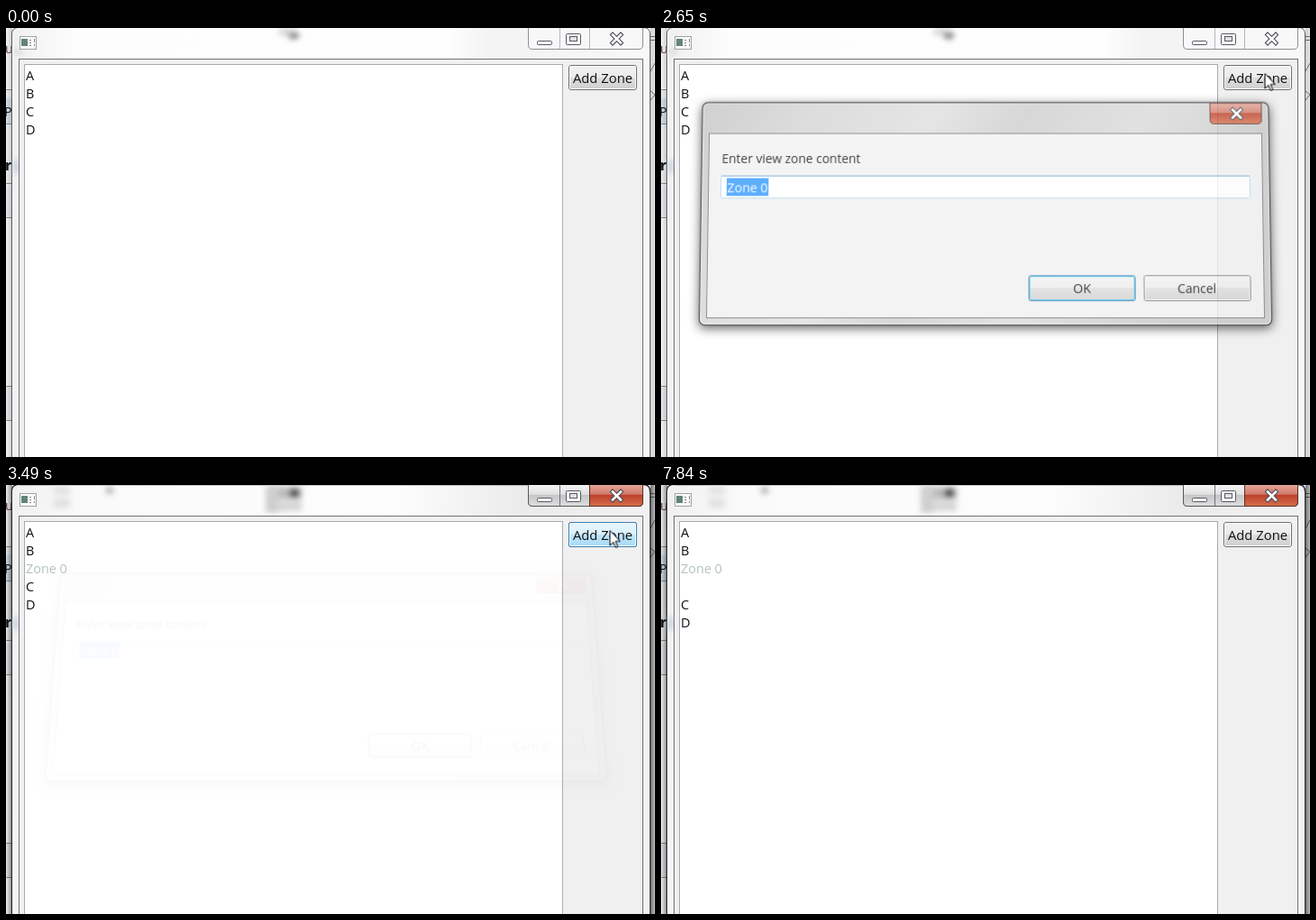
These frames come from a looping animation (720x476 px, 8 s). An HTML page:

```html
<!DOCTYPE html>
<html lang="en">
<head>
<meta charset="utf-8">
<title>View zones</title>
<style>
html, body { margin: 0; width: 100%; height: 100%; overflow: hidden; background: #fff; }
svg { position: absolute; left: 0; top: 0; width: 720px; height: 476px; overflow: hidden; }
text { font: 14.4px "Open Sans", "Noto Sans", sans-serif; fill: #111; }
.mid { text-anchor: middle; }
.anim { animation: 8s linear infinite; }
.step { animation: 8s step-end infinite; }

.active { animation-name: activate; }
@keyframes activate {
  0%, 12.25% { opacity: 0; }
  13.1%, 31.125% { opacity: 1; }
  32%, 41.6% { opacity: 0; }
  41.65%, 100% { opacity: 1; }
}
.idle { animation-name: deactivate; }
@keyframes deactivate {
  0%, 12.25% { opacity: 1; }
  13.1%, 31.125% { opacity: 0; }
  32%, 41.6% { opacity: 1; }
  41.65%, 100% { opacity: 0; }
}
.hover { animation-name: hover; }
@keyframes hover {
  0%, 23.6% { opacity: 0; }
  26.25%, 31.125% { opacity: 1; }
  32%, 41.9% { opacity: 0; }
  43.4%, 51% { opacity: 1; }
  60%, 100% { opacity: 0; }
}
.focus { animation-name: focus; }
@keyframes focus {
  0%, 41.6% { opacity: 0; }
  41.65%, 69.2% { opacity: 1; }
  74.8%, 100% { opacity: 0; }
}
.tail { animation-name: tail; }
@keyframes tail {
  0% { transform: none; }
  41.625%, 90% { transform: translateY(20px); }
  77.625%, 91.25%, 100% { transform: translateY(40px); }
}
.zone { animation-name: zone; fill: #b2c1c1; }
@keyframes zone {
  0% { visibility: hidden; }
  41.625%, 100% { visibility: visible; }
}
.caret { animation-name: caret; }
@keyframes caret {
  0%, 19%, 31.125%, 75.75% { opacity: 0; transform: none; }
  12.25%, 25.625%, 69.2%, 90% { opacity: 1; transform: none; }
  77.625%, 91.25% { opacity: 1; transform: translate(-9px, 40px); }
  84.25%, 97.875%, 100% { opacity: 0; transform: translate(-9px, 40px); }
}
.dialog { animation-name: dialog; transform-origin: 360px 205px; }
@keyframes dialog {
  0%, 31.125% { opacity: 0; transform: perspective(1000px) rotateX(14deg) scale(.94); animation-timing-function: ease-out; }
  34.4%, 41.95% { opacity: 1; transform: perspective(1000px) rotateX(0deg) scale(1); }
  42.625% { opacity: .5; transform: translate(-2px, 2px) perspective(1000px) rotateX(6deg) scale(.975); }
  43.625% { opacity: .04; transform: translate(-5px, 5px) perspective(1000px) rotateX(14deg) scale(.947); }
  44.5%, 100% { opacity: 0; transform: translate(-6px, 6px) perspective(1000px) rotateX(18deg) scale(.93); }
}
.press { animation-name: press; }
@keyframes press {
  0% { opacity: 0; }
  41.625%, 100% { opacity: 1; }
}
.pointer { animation-name: pointer; }
@keyframes pointer {
  0%, .85% { transform: translate(269px, 233px); }
  1.9%, 3.8% { transform: translate(167px, 97px); }
  9%, 18% { transform: translate(46px, 74px); }
  20.4%, 22.3% { transform: translate(503px, 46px); }
  24.25%, 28% { transform: translate(669.5px, 47.5px); }
  30%, 50.2% { transform: translate(669.5px, 50.5px); }
  52.2% { transform: translate(549px, 77px); }
  54.1% { transform: translate(337px, 49px); }
  55.1% { transform: translate(327px, 47px); }
  56.1% { transform: translate(170px, 50px); }
  57.1% { transform: translate(106px, 49px); }
  59.1% { transform: translate(80px, 52px); }
  60.1% { transform: translate(68px, 58px); }
  61.1% { transform: translate(47px, 67px); }
  62.5%, 100% { transform: translate(42px, 74px); }
}
.beam { animation-name: beam; }
@keyframes beam {
  0%, 23.6%, 77.625%, 100% { visibility: hidden; }
  .85%, 51.1% { visibility: visible; }
}
.arrow { animation-name: arrow; }
@keyframes arrow {
  0%, 51.1%, 100% { visibility: hidden; }
  23.6% { visibility: visible; }
}
</style>
</head>
<body>
<svg viewBox="0 0 720 476">
  <defs>
    <linearGradient id="face" x2="0" y2="1">
      <stop stop-color="#f2f2f2"/><stop offset=".48" stop-color="#ebebeb"/>
      <stop offset=".5" stop-color="#dddddd"/><stop offset="1" stop-color="#cfcfcf"/>
    </linearGradient>
    <linearGradient id="faceHover" x2="0" y2="1">
      <stop stop-color="#eaf6fd"/><stop offset=".48" stop-color="#d9f0fc"/>
      <stop offset=".5" stop-color="#bee6fd"/><stop offset="1" stop-color="#a7d9f5"/>
    </linearGradient>
    <linearGradient id="red" x2="0" y2="1">
      <stop stop-color="#e5a99c"/><stop offset=".46" stop-color="#d2796a"/>
      <stop offset=".5" stop-color="#bd3f2a"/><stop offset="1" stop-color="#d4704c"/>
    </linearGradient>
    <linearGradient id="steel" x2="0" y2="1">
      <stop stop-color="#f4f4f4"/><stop offset=".46" stop-color="#e2e2e2"/>
      <stop offset=".5" stop-color="#c6c6c6"/><stop offset="1" stop-color="#dedede"/>
    </linearGradient>
    <linearGradient id="bar">
      <stop stop-color="#f0f0f0"/><stop offset=".1" stop-color="#fdfdfd"/>
      <stop offset=".68" stop-color="#fefefe"/><stop offset=".75" stop-color="#f3f3f3"/>
      <stop offset="1" stop-color="#f8f8f8"/>
    </linearGradient>
    <linearGradient id="barActive" x2="1" y2=".05">
      <stop stop-color="#f0f0f0"/><stop offset=".12" stop-color="#fafafa"/>
      <stop offset=".6" stop-color="#fdfdfd"/><stop offset=".72" stop-color="#f2f2f2"/>
      <stop offset=".8" stop-color="#ebebeb"/><stop offset="1" stop-color="#f2f2f2"/>
    </linearGradient>
    <linearGradient id="shadeL"><stop stop-color="#000" stop-opacity=".04"/><stop offset="1" stop-color="#000" stop-opacity=".42"/></linearGradient>
    <linearGradient id="shadeR"><stop stop-color="#000" stop-opacity=".55"/><stop offset="1" stop-color="#000" stop-opacity=".25"/></linearGradient>
    <filter id="soft" x="-50%" y="-50%" width="200%" height="200%"><feGaussianBlur stdDeviation="3"/></filter>
    <path id="cross" d="M-4.500 -4.500 L4.500 4.500 M4.500 -4.500 L-4.500 4.500"/>
    <g id="close" stroke-linecap="square">
      <use href="#cross" stroke="#4c4f58" stroke-width="4.800"/>
      <use href="#cross" stroke="#fff" stroke-width="2.600"/>
    </g>
    <path id="frame" d="M6.500 477 V7 Q6.500 -.5 14 -.5 H707 Q714.5 -.5 714.5 7 V477 Z"/>
    <path id="caption" d="M579.5 -1 V19 Q579.5 23.5 584 23.5 H702 Q706.5 23.5 706.5 19 V-1"/>
  </defs>

  <!-- desktop strips -->
  <rect width="720" height="476" fill="#f8f8f9"/>
  <rect y="68" width="7" height="107" fill="#eff0f2"/>
  <rect y="78" width="7" height="28" fill="#d6e0e8"/>
  <rect y="176" width="7" height="34" fill="#e8ebef"/>
  <rect y="397" width="7" height="38" fill="#e8eaed"/>
  <path d="M0 68.5H7M0 106.5H7M0 172.5H7M0 210.5H7M0 397.5H7M0 435.5H7" stroke="#8c9096"/>
  <text x="-1" y="28" style="fill:#5a3a35">u</text>
  <text x="-2" y="98">P</text>
  <text x="-1" y="158" style="font-weight:700;font-size:16px">r</text>
  <path d="M715 9.5h5M715 13.5h5M715 48l5-9M715 70l5 4-5 6" fill="none" stroke="#777"/>
  <g class="anim idle">
    <rect width="7" height="476" fill="url(#shadeL)" opacity=".4"/>
    <rect x="715" width="5" height="476" fill="url(#shadeR)" opacity=".3"/>
  </g>
  <g class="anim active">
    <rect width="7" height="476" fill="url(#shadeL)"/>
    <rect x="715" width="5" height="476" fill="url(#shadeR)"/>
  </g>

  <!-- window glass -->
  <use href="#frame" fill="url(#bar)" stroke="#55585c"/>
  <g filter="url(#soft)" class="anim idle">
    <ellipse cx="319" cy="8" rx="6" ry="4" fill="#666"/>
    <rect x="303" y="2" width="18" height="5" fill="#c4c4c4"/>
    <path d="M8 24h10v5H8z" fill="#d5d5d5"/>
  </g>
  <g class="anim active">
    <use href="#frame" fill="url(#barActive)" stroke="#24272b" stroke-width="1.3"/>
    <g filter="url(#soft)">
      <path d="M53 2h18v8H53zM53 15h18v10H53z" fill="#e0e0e0"/>
      <ellipse cx="115" cy="6" rx="4" ry="4" fill="#aaa"/>
      <rect x="288" y="0" width="14" height="31" fill="#cfcfcf"/>
      <rect x="302" y="2" width="26" height="14" fill="#bbb"/>
      <rect x="302" y="18" width="26" height="11" fill="#d6d6d6"/>
      <ellipse cx="320" cy="9" rx="6" ry="5" fill="#3f3f3f"/>
    </g>
  </g>
  <path d="M7.500 476V8Q8 1 15 .5M713.5 476V8" fill="none" stroke="#fff" stroke-opacity=".8"/>
  <rect x="8" y="146" width="6" height="15" fill="#aebcd2" opacity=".65" filter="url(#soft)"/>

  <!-- program icon -->
  <rect x="15.500" y="9.500" width="18" height="14" fill="#fafafa" stroke="#9da3a3"/>
  <rect x="17" y="12" width="7" height="8" fill="#628378"/>
  <path d="M26 13.500h2M26 16.500h2M26 19.500h2M31.500 12v4M31.500 18v2" stroke="#888"/>

  <!-- caption buttons -->
  <use href="#caption" fill="#f8f8f8" stroke="#8d9094"/>
  <path d="M614.5 0V23M647.5 0V23" stroke="#b4b6b9"/>
  <g class="anim active">
    <use href="#caption" fill="url(#steel)" stroke="#55585d"/>
    <path d="M647.5 -1V23.5H702Q706.5 23.5 706.5 19V-1Z" fill="url(#red)" stroke="#59302b"/>
    <path d="M614.5 0V23" stroke="#6e7175"/>
  </g>
  <rect x="589.5" y="14.500" width="16" height="4" rx="1" fill="#fff" stroke="#555963"/>
  <rect x="621.5" y="6.500" width="16" height="12" rx="1" fill="#fff" stroke="#555963"/>
  <rect x="625.5" y="9.500" width="8" height="5" fill="#e2e2e2" stroke="#555963"/>
  <use href="#close" x="677.5" y="12"/>

  <!-- client area -->
  <rect x="14.500" y="34.500" width="692" height="450" fill="#f0f0f0" stroke="#6e7276"/>
  <rect x="20.500" y="40.500" width="597" height="450" fill="#fff" stroke="#a8abb0"/>
  <text x="22" y="58">A</text>
  <text x="22" y="78">B</text>
  <g class="step tail">
    <text x="22" y="98">C</text>
    <text x="22" y="118">D</text>
  </g>
  <rect class="step caret" x="31" y="63" width="1" height="19" fill="#000"/>

  <!-- Add Zone button -->
  <rect x="624.5" y="41.500" width="75" height="27" rx="2.500" fill="url(#face)" stroke="#707070"/>
  <rect x="625.5" y="42.500" width="73" height="25" rx="1.500" fill="none" stroke="#fafafa"/>
  <g class="anim focus" fill="none">
    <rect x="624.5" y="41.500" width="75" height="27" rx="2.500" stroke="#3c7fb1"/>
    <rect x="625.5" y="42.500" width="73" height="25" rx="1.500" stroke="#48c5ee"/>
  </g>
  <g class="anim hover">
    <rect x="624.5" y="41.500" width="75" height="27" rx="2.500" fill="url(#faceHover)" stroke="#3c7fb1"/>
    <rect x="625.5" y="42.500" width="73" height="25" rx="1.500" fill="none" stroke="#f3fbff"/>
  </g>
  <text class="mid" x="662" y="61" style="font-size:14.8px">Add Zone</text>
</svg>

<svg class="anim dialog" viewBox="0 0 720 476">
  <defs>
    <linearGradient id="glass" x2="1" y2=".25">
      <stop stop-color="#c3c3c3"/><stop offset=".18" stop-color="#d3d3d3"/>
      <stop offset=".4" stop-color="#dedede"/><stop offset=".55" stop-color="#cdcdcd"/>
      <stop offset=".75" stop-color="#d9d9d9"/><stop offset="1" stop-color="#c6c6c6"/>
    </linearGradient>
  </defs>
  <rect x="40.500" y="80.500" width="639" height="250" rx="6" fill="url(#glass)" stroke="#303235" stroke-width="1.4"
        style="filter:drop-shadow(0 3px 6px rgba(0,0,0,.75))"/>
  <rect x="41.800" y="81.800" width="636.400" height="247.400" rx="5" fill="none" stroke="#fff" stroke-opacity=".7"/>
  <path d="M613.5 81V100Q613.5 104.500 618 104.500H667Q671.5 104.500 671.5 100V81Z" fill="url(#red)" stroke="#59302b"/>
  <use href="#close" x="643.5" y="93"/>
  <rect x="48.500" y="115.500" width="623" height="207" fill="#f0f0f0" stroke="#707478"/>
  <text x="63" y="149" style="font-size:14px">Enter view zone content</text>
  <rect x="62.500" y="163.500" width="595" height="25" rx="1" fill="#fff" stroke="#b5d6ec"/>
  <path d="M63 163.500H657" stroke="#5c9fd0"/>
  <rect x="69" y="166" width="47" height="20" fill="#3399ff"/>
  <text x="69.500" y="182" style="fill:#fff">Zone 0</text>
  <rect x="408.5" y="275.500" width="119" height="28" rx="2.500" fill="url(#face)" stroke="#3c7fb1"/>
  <rect x="409.5" y="276.500" width="117" height="26" rx="1.500" fill="none" stroke="#48c5ee"/>
  <g class="step press" fill="none">
    <rect x="409.5" y="276.500" width="117" height="26" rx="1.500" stroke="#2f9fd6"/>
    <rect x="411.5" y="278.500" width="113" height="22" stroke="#666" stroke-dasharray="1 1"/>
  </g>
  <text class="mid" x="468" y="295.500">OK</text>
  <rect x="537.5" y="275.500" width="119" height="28" rx="2.500" fill="url(#face)" stroke="#707070"/>
  <rect x="538.5" y="276.500" width="117" height="26" rx="1.500" fill="none" stroke="#fafafa"/>
  <text class="mid" x="596.5" y="295.500" style="font-size:14px">Cancel</text>
</svg>

<svg viewBox="0 0 720 476">
  <text class="step zone" x="22" y="98">Zone 0</text>
  <g class="anim pointer">
    <path class="step beam" d="M-3 -7.500h2.500M.5 -7.500h2.500M0 -7V7M-3 7.500h2.500M.5 7.500h2.500" fill="none" stroke="#000"/>
    <path class="step arrow" d="M.5 0V16.500L4.300 13 7 19 9.300 18 6.700 12H12Z" fill="#fff" stroke="#000"/>
  </g>
</svg>
</body>
</html>
```
